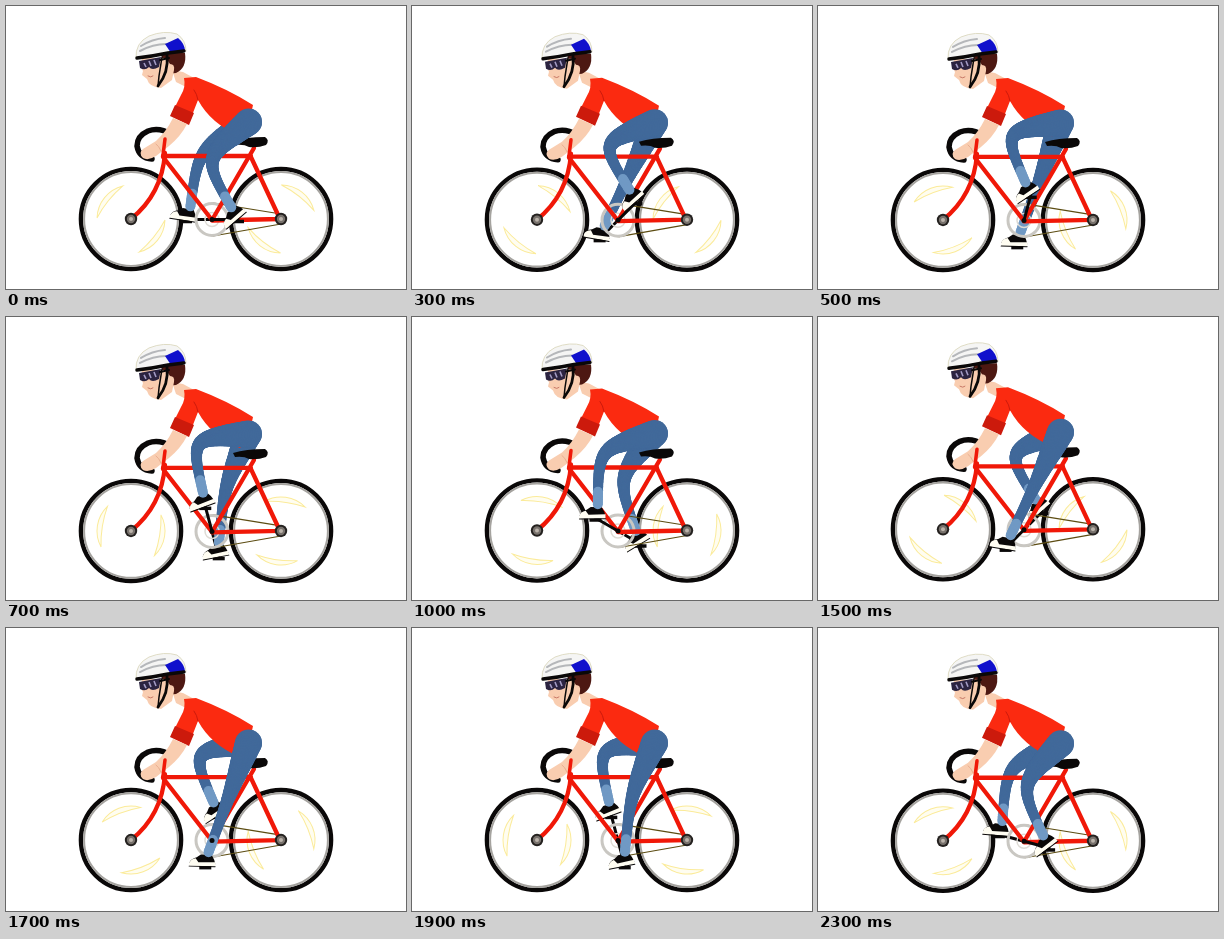
An HTML page with a canvas that plays this animation: 400 by 283 pixels, repeating every 2.4 s.

```html
<!DOCTYPE html>
<html>
<head>
<meta charset="utf-8">
<style>
html, body { margin: 0; width: 100%; height: 100%; overflow: hidden; background: #fff; }
canvas { display: block; }
</style>
</head>
<body>
<canvas id="stage" width="400" height="283"></canvas>
<script>
const ctx = document.getElementById('stage').getContext('2d');
const RED = '#fb2a10', TUBE = '#f01808', DARK_RED = '#cc1a0c';
const BLACK = '#0a0808', SKIN = '#f9cdb0', JEANS = '#41699a', CUFF = '#7099c4';
const STEP = 100, STEPS = 24, DEG = Math.PI / 180;
const AXLE = 213, CRANK = { x: 206, y: 213.5 }, HIP = { x: 242.5, y: 116 };
const CRANK_LEN = 26, BONE = 58;

function fill(d, color) {
  ctx.fillStyle = color;
  ctx.fill(new Path2D(d));
}
function line(d, color, width, cap = 'round') {
  ctx.strokeStyle = color;
  ctx.lineWidth = width;
  ctx.lineCap = cap;
  ctx.lineJoin = 'round';
  ctx.stroke(new Path2D(d));
}
function disc(x, y, r, color) {
  ctx.fillStyle = color;
  ctx.beginPath();
  ctx.arc(x, y, r, 0, 7);
  ctx.fill();
}
function ring(x, y, r, color, width) {
  ctx.strokeStyle = color;
  ctx.lineWidth = width;
  ctx.beginPath();
  ctx.arc(x, y, r, 0, 7);
  ctx.stroke();
}
function placed(x, y, angle, draw) {
  ctx.save();
  ctx.translate(x, y);
  ctx.rotate(angle);
  draw();
  ctx.restore();
}

function glint() {
  ctx.beginPath();
  ctx.arc(0, 0, 34, -0.65, 0.65);
  ctx.quadraticCurveTo(31, 0, 27.1, -20.6);
  ctx.fillStyle = '#fffdf0';
  ctx.fill();
  ctx.strokeStyle = '#fbeb9a';
  ctx.lineWidth = 1;
  ctx.stroke();
}
function wheel(x, degrees) {
  ring(x, AXLE, 50.1, BLACK, 4.4);
  ring(x, AXLE, 46.9, '#a5a39f', 2);
  for (const turn of [0, 180]) placed(x, AXLE, -(degrees + turn) * DEG, glint);
}
function hub(x) {
  disc(x, AXLE, 6.2, '#24211f');
  disc(x, AXLE, 4.2, '#77716c');
  disc(x, AXLE, 2, '#bbb3aa');
}

function shoe() {
  fill('M-14-1Q-13-5-7-7L-3-10 8-10Q11-6 12-1Z', BLACK);
  fill('M-14-1Q-13-5-8-6L-5-2 12-3V1L-14 2Z', '#fffdf2');
  line('M-14 2.3L12 1.5', BLACK, 1);
}

// Tapering limb that bows around the knee
function limb(knee, ankle) {
  for (let t = 0; t <= 1; t += 0.01) {
    const u = 1 - t, a = u ** 3, b = 3 * t * u, c = t ** 3;
    const at = axis => a * HIP[axis] + b * knee[axis] + c * ankle[axis];
    disc(at('x'), at('y'), 5 + 8.5 * u ** 2.4, t > 0.91 ? CUFF : JEANS);
  }
}

function leg(degrees) {
  const a = degrees * DEG;
  const pedal = { x: CRANK.x + CRANK_LEN * Math.cos(a), y: CRANK.y - CRANK_LEN * Math.sin(a) };
  const tilt = (-14 - 27 * Math.cos(a - 25 * DEG)) * DEG;
  const c = Math.cos(tilt), s = Math.sin(tilt);
  const ankle = { x: pedal.x + 2 * c + 12 * s, y: pedal.y + 2 * s - 12 * c };

  const dx = ankle.x - HIP.x, dy = ankle.y - HIP.y, d = Math.hypot(dx, dy);
  const bend = Math.sqrt(Math.max(0, BONE * BONE - d * d / 4));
  const knee = { x: HIP.x + dx / 2 - dy / d * bend, y: HIP.y + dy / 2 + dx / d * bend };

  line(`M${CRANK.x} ${CRANK.y}L${pedal.x} ${pedal.y}`, BLACK, 3);
  line(`M${pedal.x - 6} ${pedal.y + 2}h12`, BLACK, 3.5, 'butt');
  placed(pedal.x - 2, pedal.y - 1, tilt, shoe);
  limb(knee, ankle);
}

function drivetrain() {
  line('M207 197L275 208M207 230L275 218', '#5c4c12', 1.2);
  ring(CRANK.x, CRANK.y, 16, '#c9c7c2', 3);
  ring(CRANK.x, CRANK.y, 7, '#dedbd5', 1.5);
}

function frame() {
  line('M157 150H245M157 151L206 214M248 142L206 214M244 149L274 213L206 214.5', TUBE, 4.3);
  line('M159 147Q156 188 125 213', TUBE, 4.3);
  fill('M227 135Q240 131 259 131Q264 134 260 139Q252 142 243 141Q238 138 229 139Z', BLACK);
}

function handlebar() {
  line('M165 128Q153 121 142 125Q131 130 131 140Q133 152 146 153', BLACK, 5.5);
}

function torso() {
  fill('M166 64L170 76 182 82 190 73 177 66Z', SKIN);
  fill('M178 72L190 71Q222 83 247 99Q244 118 234 130Q205 118 192 94L183 117 165 109 175 89Q180 81 178 72Z', RED);
  line('M192 94Q191 88 188 84', DARK_RED, 1);
  fill('M169 99L188 107 183 119 164 110Z', DARK_RED);
}

function arm() {
  fill('M167 112L181 118Q175 130 163 140L150 150Q142 155 137 152Q132 147 137 143L150 135Q160 126 167 112Z', SKIN);
  line('M150 138Q153 140 155 145', '#e9ae90', 1);
  line('M159 133L157 149', TUBE, 3.5);
}

function head() {
  fill('M155 47H179Q181 62 170 67L160 68Z', '#4d1812');
  fill('M136 52H160L164 58Q169 58 168 64L166 74 155 82Q143 81 141 73L136 69 137 65 135 61Z', SKIN);
  line('M142 70Q145 72 147 70', '#c87866', 1);
  fill('M133 55L155 51 153 61Q146 65 143 61Q139 65 134 62Z', '#2b2340');
  line('M138 57L140 61M143 55L145 60M148 54L150 59', '#a39bc4', 1.6, 'butt');
  line('M154 54L163 52', BLACK, 2);
  line('M161 49Q163 66 152 80', BLACK, 2.8);
  line('M156 51L153 70 152 80', BLACK, 1.5);
  fill('M130 52Q129 37 143 30Q158 24 171 28Q180 34 180 45Q154 47 130 52Z', '#f5f5f4');
  line('M130 52Q129 37 143 30Q158 24 171 28Q180 34 180 45', '#d9d5b8', 0.8);
  line('M135 40Q146 33 159 32M134 45Q147 38 160 38', '#b5b7ba', 2);
  fill('M159 38L172 32Q178 37 179 44L165 47Z', '#1010cc');
  line('M131 52Q148 50 162 47L178 45', BLACK, 3.4);
}

function draw(now) {
  const k = Math.floor(now / STEP) % STEPS;
  const crank = k * 15, spin = k * 30;
  ctx.fillStyle = '#fff';
  ctx.fillRect(0, 0, 400, 283);
  ctx.save();
  ctx.translate(0, Math.sin(crank * DEG));
  wheel(125, 141 + spin);
  wheel(275, 52 + spin);
  leg(crank + 180);
  handlebar();
  drivetrain();
  frame();
  hub(125);
  hub(275);
  torso();
  leg(crank);
  disc(CRANK.x, CRANK.y, 2.5, BLACK);
  arm();
  head();
  ctx.restore();
}

const start = performance.now();
function tick() {
  draw(performance.now() - start);
  requestAnimationFrame(tick);
}
tick();
</script>
</body>
</html>
```
